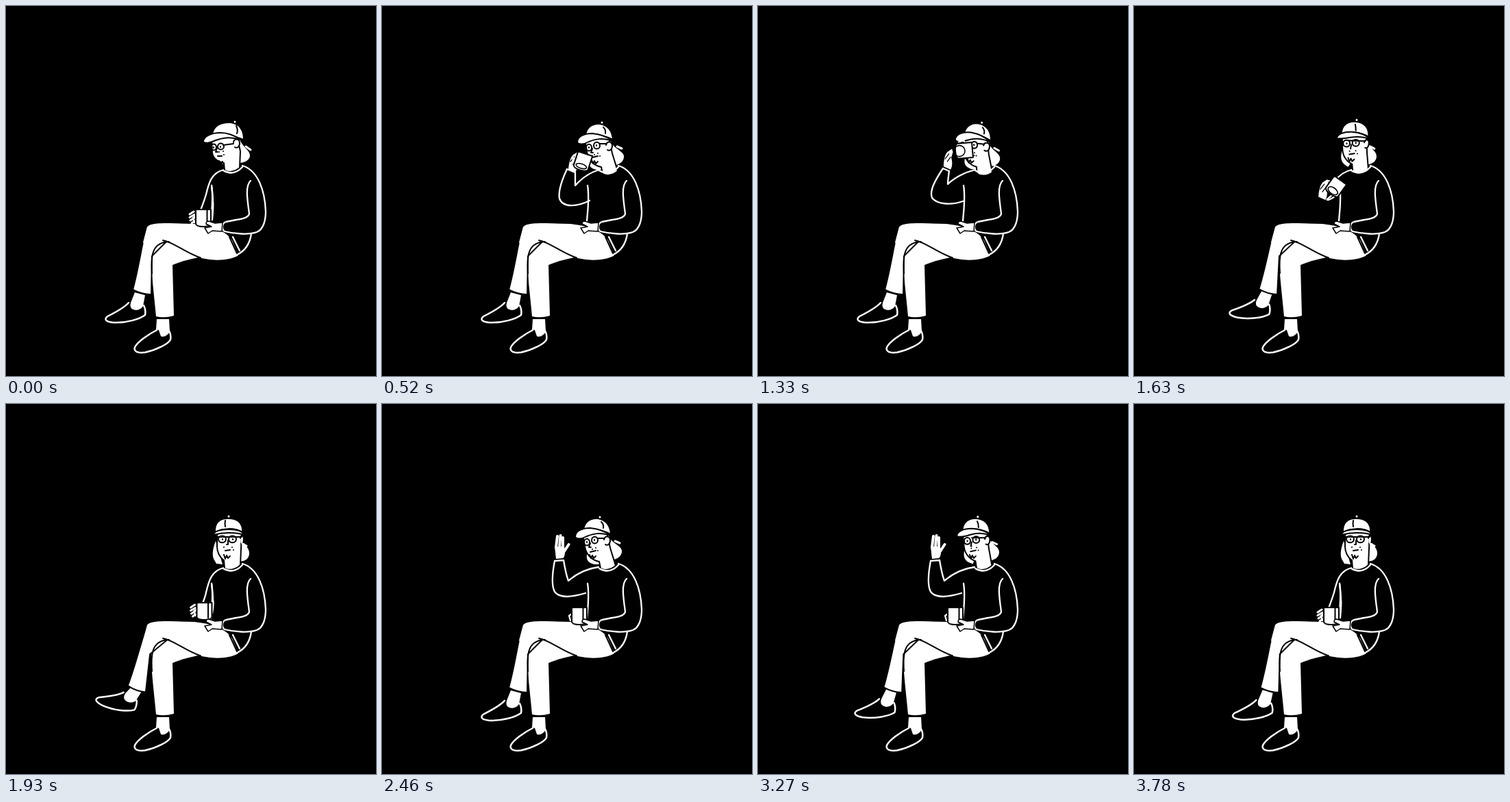
These frames come from a looping animation (540 px wide and 540 px high, 4530 ms). An HTML page:

```html
<!DOCTYPE html>
<html lang="en">
<head>
<meta charset="utf-8">
<title>Coffee and a wave</title>
<style>
html, body { margin: 0; height: 100%; background: #000; overflow: hidden; }
svg { display: block; width: 100vw; height: 100vh; }
.line { fill: none; stroke: #fff; stroke-width: 2.3; }
.ink { fill: none; stroke: #000; stroke-width: 2; }
.white { fill: #fff; }
.edged { fill: #fff; stroke: #000; stroke-width: 2; }
.shoe { fill: #000; stroke: #fff; stroke-width: 2.5; }
</style>
</head>
<body>
<svg viewBox="0 0 540 540" stroke-linecap="round" stroke-linejoin="round">
  <!-- standing leg -->
  <path class="shoe" d="M220 473C208 479 192 490 188 498C186 504 192 507 203 505.500C220 502 237 493 240 487C241 482 240 478 238 474"/>
  <path class="white" d="M220 457H238L239 475C236 481 230 484 226 482L223 473L219 472Z"/>
  <path class="white" d="M287 366Q262 370 243 378L245 452Q231 456 219 453C216 420 212 390 212 370C213 350 225 343 240 343Z"/>

  <!-- crossed leg -->
  <g id="shin">
    <g id="foot">
      <path class="shoe" d="M179 433C172 441 158 448 148 453C142 458 147 461 157 462C175 463 195 457 203 451C204 446 203 441 201 437"/>
      <path class="white" d="M188 418L203 422L200 438C197 443 190 445 186 443Q180 441 182 433Z"/>
    </g>
    <path class="edged" d="M206 321C200 335 195 378 185 414Q198 421 212 421L213 365L238 340Z"/>
  </g>
  <path class="white" d="M206 322.500C210 318 218 317 240 317L275 318C305 321 322 330 330 342L339 364C325 372 305 372 285 368C262 360 245 345 229 342L213 362L200 345Z"/>
  <path class="ink" d="M213 390C211 362 214 345 238 344M229 342C245 345 262 360 284 367.500"/>

  <!-- sweater -->
  <path class="line" d="M300 262C303 280 300 300 299 314M358 332C356 347 350 357 337 363M331 337L341 357"/>
  <path class="ink" d="M326 337L337 361" stroke-width="3"/>
  <path class="line" id="arm"/>
  <path class="line" style="fill:#000" d="M357 255C349 262 352 282 355 303C354 309 345 311 336 312L321 315C315 317 314 326 319 329C335 333 354 334 366 330C376 326 379 312 379 300C378 270 368 240 345 233"/>

  <g id="head"></g>
  <path class="line" d="M317 240Q332 249 345 235"/>

  <g id="hand">
    <g id="grip">
      <path class="white" d="M-5 -2C-4 -12 -2 -19 2 -23L9 -27L10 -22L7 -14C9 -6 7 0 5 3Z"/>
      <path class="ink" stroke-width="1" d="M-2 -13L4 -20M1 -9L6 -15" style="stroke-width:1.300"/>
    </g>
    <g id="palm">
      <path class="white" d="M-5 -1L-7 -19H7L8 -12Q8 -4 5 -2Z"/>
      <path class="line" style="stroke-width:4" d="M-5 -18L-3 -34M0 -18L1.500 -35M5 -18L5 -32M5 -9L13.500 -22"/>
    </g>
  </g>
  <g id="mug">
    <path class="line" d="M-12 -2l-3 2 2 7"/>
    <path class="line" id="fingers" style="stroke-width:3" d="M-20 -5l6-4M-20 -.500l7-4M-19 4l6-4M-17 8l4-3"/>
    <path class="edged" d="M-11 -12H11V9Q10 13 0 13T-11 9Z"/>
    <path class="ink" id="stripe" d="M5.500 -11V10"/>
    <ellipse class="ink" id="base" cy="7" rx="8" style="stroke-width:1.600"/>
  </g>
  <path class="edged" style="stroke-width:1.500" d="M316 316L305 317L296 314Q292 314 292 318L300 322L290 324L295 332L301 328L315 329Z"/>
</svg>

<script>
const $ = id => document.getElementById(id);
const LOOP = 4530, STEP = 102.2, LAST = 37;

// Blends every number in two strings of the same structure.
const number = /-?\d+(\.\d+)?/g;
const mix = (a, b, u) => {
  const ends = b.match(number);
  let i = 0;
  return a.replace(number, v => (+v + (ends[i++] - v) * u).toFixed(2));
};

// Reads a track of [time, string] keys with eased steps between them.
const track = (keys, t) => {
  const i = keys.findIndex(k => k[0] > t);
  if (i < 0) return keys[keys.length - 1][1];
  const [t0, a] = keys[i - 1], [t1, b] = keys[i];
  const u = (t - t0) / (t1 - t0);
  return mix(a, b, u * u * (3 - 2 * u));
};

// Each head part: class, then its shape looking down, sideways and ahead.
const headParts = [
  ['white',
    'M304 212C305 222 306 226 311 228L320 232L320 212Z',
    'M300 215C297 225 299 232 310 234L318 234L318 215Z',
    'M306 200C303 208 300 218 303 226C307 233 316 234 322 232L322 200Z'],
  ['white',
    'M341 194C344 205 357 211 356 219C355 227 344 230 336 229L318 225L320 200Z',
    'M331 192C334 204 351 206 350 216C349 224 340 228 334 227L318 226L318 200Z',
    'M344 194C346 206 356 209 355 219C354 228 346 230 338 230L325 228L325 200Z'],
  ['edged',
    'M300 194L337 190L342 212L341 236C333 243 324 243 319 240L318 229C309 228 302 222 301 214Z',
    'M293 190L328 186L333 210L341 236C333 243 324 243 319 240L317 230C306 228 298 220 296 208Z',
    'M308 188L344 188L343 212L342 235C334 243 324 243 319 240L318 228C312 224 308 216 308 208Z'],
  ['edged',
    'M332 199C332 193 341 193 341 200C341 206 337 208 334 206',
    'M324 198C324 192 333 192 333 199C333 205 329 207 326 205',
    'M342 196C342 191 347 191 347 196C347 202 346 205 343 204'],
  ['ink',
    'M299 206C299 200 307 200 307 206C307 212 299 212 299 206M309 205C309 199 318 199 318 205C318 211 309 211 309 205M317 203L332 201',
    'M295 202C295 195 303 195 303 202C303 208 295 208 295 202M306 199C306 192 315 192 315 199C315 205 306 205 306 199M314 196L325 196',
    'M310 197C310 191 321 191 321 197C321 204 310 204 310 197M325 197C325 191 336 191 336 197C336 204 325 204 325 197M309 194L344 194'],
  ['ink',
    'M303 206L303 207M313 205L313 206M308 207L306 213L309 213M309 219L315 219',
    'M299 201L299 202M310 198L310 199M304 203L302 209L305 209M304 216L312 214',
    'M316 197L316 198M331 197L331 198M324 199L324 205L322 205M320 214L327 213'],
  ['ink',
    'M311 213L311 213M317 212L317 212M318 217L318 217M307 225L309 230L311 226L313 230L316 227',
    'M307 212L307 212M312 210L312 210M315 214L315 214M303 220L305 225L307 221L309 225L312 222',
    'M318 209L318 209M330 209L330 209M332 213L332 213M318 220L320 226L322 221L324 225L327 222'],
  ['edged',
    'M301 188C302 175 314 169 328 170C341 172 347 181 347 195C336 192 322 184 301 188Z',
    'M294 184C295 172 304 166 315 167C327 169 333 177 334 190C322 184 309 180 294 184Z',
    'M305 187C304 173 313 166 325 167C338 167 346 174 345 187C333 180 316 181 305 187Z'],
  ['edged',
    'M288 198C288 190 300 185 313 185C326 185 335 190 342 195C325 190 315 193 306 196C298 200 290 201 288 198Z',
    'M282 194C282 186 291 181 304 181C316 182 327 187 334 192C318 187 309 189 299 193C292 197 284 198 282 194Z',
    'M303 191C303 186 313 183 325 183C337 183 346 186 347 191C340 188 333 188 325 188C317 188 310 189 303 191Z'],
  ['ink',
    'M336 175Q339 181 337 186', 'M320 172Q324 176 323 181', 'M320 170Q319 174 320 179'],
  ['line',
    'M334 169L334 169.100M350 205L357 210', 'M318 165L318 165.100M340 200L347 203', 'M325 164L325 164.100M345 204L351 207']
].map(([type, ...shapes]) => {
  const path = document.createElementNS('http://www.w3.org/2000/svg', 'path');
  path.setAttribute('class', type);
  if (type === 'line') path.style.strokeWidth = 3;
  $('head').append(path);
  return { path, shapes };
});

const lap = {
  arm: 'M301 312C302 300 303 290 302 285C302 278 301 270 300 262M284 298C287 290 290 282 292 275C296 258 300 243 318 239M284 298L284 298',
  hand: 'translate(273 312) rotate(0)', mug: 'translate(288 309) rotate(0)'
};
const hold = {
  ...lap,
  arm: 'M301 305C302 300 303 290 302 285C302 278 301 270 300 262M287 291C288 288 291 281 292 275C296 258 300 243 318 239M287 291L287 291',
  mug: 'translate(289.5 302) rotate(0)'
};
const sip = {
  arm: 'M270 238C262 255 257 270 259 281C264 295 285 293 303 284M282 243C282 249 282 256 282 262C290 253 300 244 317 239M270 238L282 243',
  hand: 'translate(277 240) rotate(0)', mug: 'translate(293 227) rotate(18)'
};
const gulp = {
  arm: 'M270 237C258 255 250 270 254 280C262 291 285 290 299 285M279 241C278 248 277 254 277 260C285 252 300 243 317 239M270 237L279 241',
  hand: 'translate(276 236) rotate(-4)', mug: 'translate(301 211) rotate(85)'
};
const waveIn = {
  arm: 'M252 229C248 250 247 265 252 274C260 285 280 281 297 276M265 228C267 240 269 250 272 258C285 247 300 240 316 238M252 229L265 228',
  hand: 'translate(259 227) rotate(0)', mug: lap.mug
};
const waveOut = {
  arm: 'M245 236C248 255 250 268 256 276C265 285 285 280 297 276M256 233C262 243 268 252 272 258C285 247 300 240 316 238M245 236L256 233',
  hand: 'translate(250 233) rotate(-20)', mug: lap.mug
};
const poses = [[0, lap], [511, sip], [870, gulp], [1330, gulp], [1880, hold], [1942, hold],
  [2400, waveIn], [2460, waveIn], [2860, waveOut], [3260, waveIn], [3580, waveOut], [3780, lap]];
const part = name => poses.map(([t, pose]) => [t, pose[name]]);
const armTrack = part('arm'), handTrack = part('hand'), mugTrack = part('mug');

const side = [[0, '0'], [511, '1']];
const front = [[0, '0'], [1390, '0'], [1840, '1'], [1942, '1'], [2400, '0'], [3060, '0'], [3550, '1']];
const tilt = [[0, 'translate(0 0) rotate(0 328 199)'], [511, 'translate(3 5) rotate(0 328 199)'],
  [870, 'translate(5 6) rotate(6 328 199)'], [1330, 'translate(5 6) rotate(6 328 199)'],
  [1840, 'translate(0 0) rotate(0 328 199)']];

const show = (id, on) => $(id).style.display = on ? '' : 'none';

function draw(t) {
  const w = +track(side, t), f = +track(front, t);
  for (const { path, shapes: [down, left, ahead] } of headParts)
    path.setAttribute('d', mix(mix(down, left, w), ahead, f));
  $('head').setAttribute('transform', track(tilt, t));

  const mug = track(mugTrack, t), tipped = mug.match(number)[2] / 85;
  $('arm').setAttribute('d', track(armTrack, t));
  $('hand').setAttribute('transform', track(handTrack, t));
  $('mug').setAttribute('transform', mug);
  $('base').setAttribute('ry', 2 + 6 * tipped);
  const drinking = t > 50 && t < 1820, waving = t > 1980 && t < 3760;
  show('grip', drinking);
  show('palm', waving);
  show('fingers', !drinking && !waving);
  show('base', tipped > .1);
  show('stripe', tipped <= .1);

  const swing = t > 1430 && t < 3430 ? (1 - Math.cos((t - 1430) * Math.PI / 500)) / 2 : 0;
  const kick = t > 2900 ? Math.max(swing, .08) : swing;
  $('shin').setAttribute('transform', `rotate(${5.4 * kick} 212 335)`);
  $('foot').setAttribute('transform', `translate(${2.5 * kick} ${-4 * kick}) rotate(${16 * kick} 195 425)`);
}

function tick() {
  const t = performance.now() % LOOP;
  draw(Math.min(LAST, Math.floor((t + 12) / STEP)) * STEP);
  requestAnimationFrame(tick);
}
tick();
</script>
</body>
</html>
```
